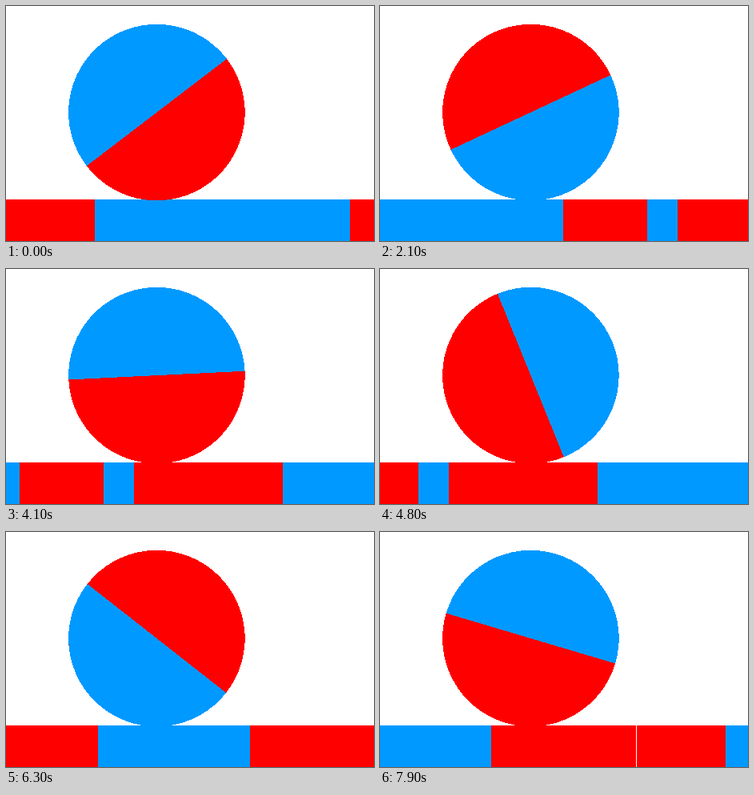
Animation, 460 px wide and 294 px high, one loop 8000 ms. Source, as an HTML page:

```html
<!DOCTYPE html>
<html lang="en">
<head>
<meta charset="utf-8">
<title>Rolling two-colour disc</title>
<style>
  html, body { margin: 0; width: 100%; height: 100%; overflow: hidden; background: #fff; }
  svg { display: block; width: 460px; height: 294px; shape-rendering: crispEdges; }
  .red { fill: #f00; }
  .blue { fill: #09f; }
</style>
</head>
<body>
<svg viewBox="0 0 460 294">
  <defs><g id="strip"></g></defs>
  <g id="ground">
    <use href="#strip"/>
    <use href="#strip" x="1131"/>
  </g>
  <g transform="translate(188.4 133.1)">
    <g id="disc">
      <circle class="red" r="110.3"/>
      <path class="blue" d="M-110.3 0A110.3 110.3 0 0 1 110.3 0Z"/>
    </g>
  </g>
</svg>
<script>
const LOOP = 8000;
const STEP = 100;
const START_ANGLE = -37.4;
const DEGREES_PER_PIXEL = 0.9555;

// Band borders along the ground; colours alternate, starting with red.
const borders = [0, 111, 430, 535, 573, 759, 949, 1130];

// [time in ms, distance rolled in px]
const path = [
  [0, 0], [500, 39], [1300, 118], [3000, 295],
  [4100, 413], [5500, 561], [7000, 717], [7900, 810]
];

const byId = id => document.getElementById(id);
const ground = byId('ground');
const disc = byId('disc');

byId('strip').innerHTML = borders.slice(1).map((end, i) =>
  `<rect class="${i % 2 ? 'blue' : 'red'}" x="${borders[i]}" y="242" width="${end - borders[i]}" height="52"/>`
).join('');

function distanceAt(time) {
  const next = Math.max(1, path.findIndex(([t]) => t >= time));
  const [t0, d0] = path[next - 1];
  const [t1, d1] = path[next];
  return d0 + (d1 - d0) * (time - t0) / (t1 - t0);
}

function render(now) {
  const time = Math.floor((now % LOOP) / STEP) * STEP;
  const distance = distanceAt(time);
  ground.setAttribute('transform', `translate(${-Math.round(distance)} 0)`);
  disc.setAttribute('transform', `rotate(${START_ANGLE + distance * DEGREES_PER_PIXEL})`);
}

const start = performance.now();

function tick() {
  render(performance.now() - start);
  requestAnimationFrame(tick);
}

tick();
</script>
</body>
</html>
```
